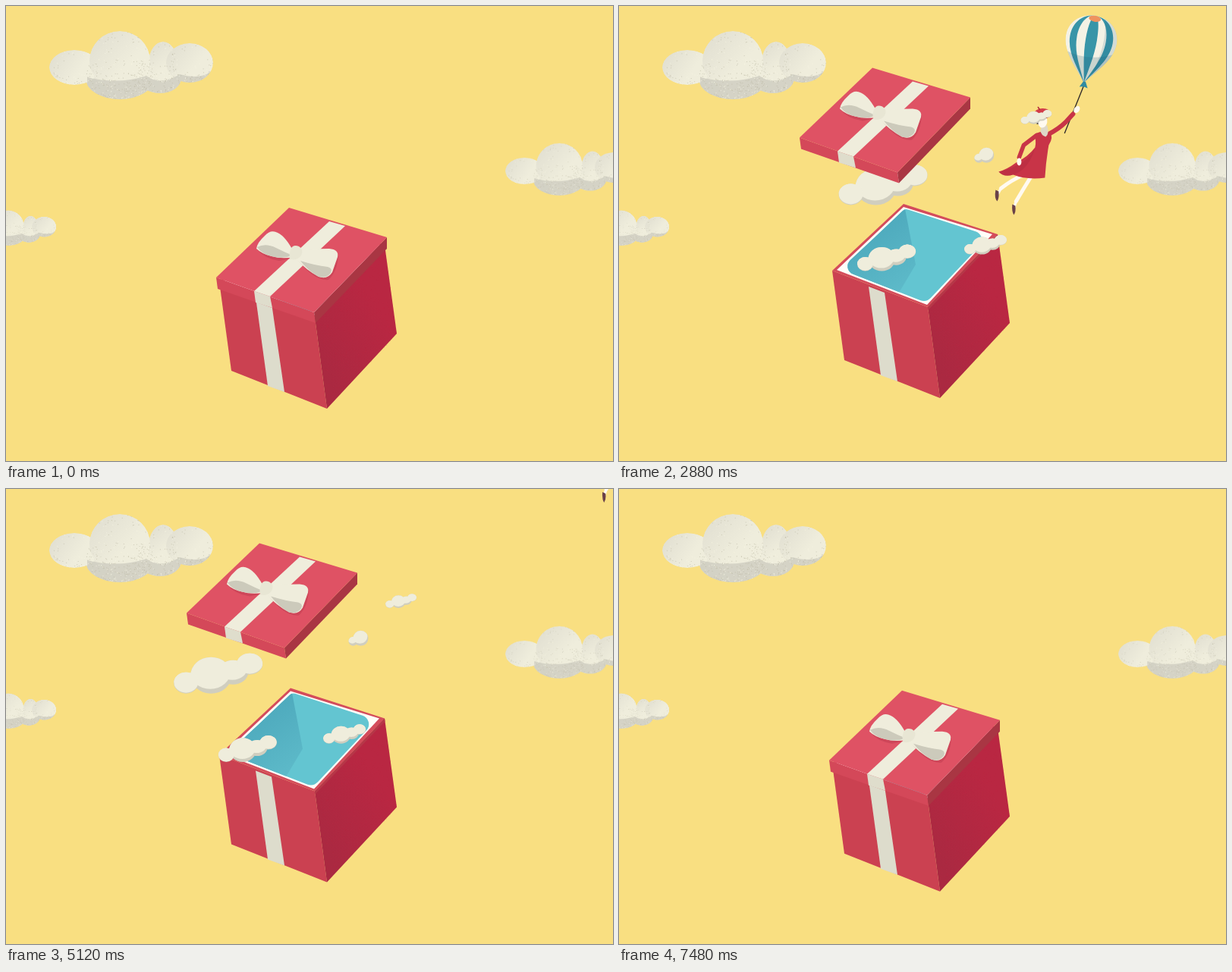
These frames come from a looping animation (800x600 px, 7.52 s). An HTML page with a canvas:

```html
<!DOCTYPE html>
<html lang="en">
<head>
<meta charset="utf-8">
<title>Gift box</title>
<style>
html, body { margin: 0; width: 100%; height: 100%; overflow: hidden; background: #f9df81; }
canvas { display: block; }
</style>
</head>
<body>
<canvas id="stage" width="800" height="600"></canvas>
<script>
const LOOP = 7520;
const ctx = document.getElementById('stage').getContext('2d');
const CREAM = '#efeddc', SHADE = '#d0cebf', SKIN = '#fffaf0', HAIR = '#2e2a30';
const RED = '#c83447', TEAL = '#3895a8', WHITE = '#f4f2e5';

let seed = 7;
const rnd = () => (seed = (seed * 16807) % 2147483647) / 2147483647;

// Progress of t from a to b, and two easings of it.
const span = (t, a, b) => Math.min(1, Math.max(0, (t - a) / (b - a)));
const smooth = u => u * u * (3 - 2 * u);
const overshoot = u => 1 + 3.2 * (u - 1) ** 3 + 2.2 * (u - 1) ** 2;

function fill(color, d, g = ctx) {
  g.fillStyle = color;
  g.fill(new Path2D(d));
}
function line(color, width, d) {
  ctx.strokeStyle = color;
  ctx.lineWidth = width;
  ctx.stroke(new Path2D(d));
}
function oval(color, x, y, rx, ry, turn = 0) {
  ctx.fillStyle = color;
  ctx.beginPath();
  ctx.ellipse(x, y, rx, ry, turn, 0, 7);
  ctx.fill();
}
function placed(x, y, draw, scale = 1, turn = 0) {
  ctx.save();
  ctx.translate(x, y);
  ctx.rotate(turn);
  ctx.scale(scale, scale);
  draw();
  ctx.restore();
}
function blend(x0, y0, x1, y1, from, to, g = ctx) {
  const grad = g.createLinearGradient(x0, y0, x1, y1);
  grad.addColorStop(0, from);
  grad.addColorStop(1, to);
  return grad;
}
function ovals(list, dx = 0, dy = 0) {
  const p = new Path2D();
  for (const [x, y, rx, ry] of list) {
    p.moveTo(x + dx + rx, y + dy);
    p.ellipse(x + dx, y + dy, rx, ry, 0, 0, 7);
  }
  return p;
}

// Large grainy cloud, painted once.
function grainyCloud() {
  const c = document.createElement('canvas');
  c.width = 220;
  c.height = 94;
  const g = c.getContext('2d');
  const parts = [[146, 63, 28, 20], [93, 64, 45, 27], [150, 42, 19, 27], [185, 43, 31, 26], [33, 49, 33, 23], [93, 40, 40, 39]];
  g.clip(ovals(parts));
  for (const [x, y, rx, ry] of parts) {
    g.fillStyle = blend(x - rx, y - ry, x + rx * .2, y + ry * .2, '#dfddd0', CREAM, g);
    g.fill(ovals([[x, y, rx, ry]]));
  }
  fill('rgba(205,203,191,.75)', 'M50 62Q92 72 128 60Q146 74 172 58Q200 66 215 53V94H50Z', g);
  for (const [x, y, rx, ry] of parts) {
    for (let i = 0; i < rx * ry * .5; i++) {
      const r = Math.sqrt(rnd()), a = rnd() * 2 * Math.PI;
      if (rnd() > r * r * (.2 + .8 * Math.max(0, Math.sin(a + .35)))) continue;
      g.fillStyle = rnd() < .6 ? 'rgba(185,182,160,.6)' : 'rgba(250,248,230,.7)';
      g.fillRect(x + rx * r * Math.cos(a), y + ry * r * Math.sin(a), 1, 1);
    }
  }
  return c;
}
const bigCloud = grainyCloud();

const PUFFS = [[-42, 13, 16, 14], [-9, 3, 27, 24], [20, -1, 20, 16], [42, -12, 17, 14]];
const TINY = [[-7, 4, 6, 6], [3, 0, 10, 10]];

function puff(list) {
  const shape = ovals(list);
  ctx.fillStyle = SHADE;
  ctx.fill(shape);
  ctx.clip(shape);
  ctx.fillStyle = CREAM;
  ctx.fill(ovals(list, -1, list === TINY ? -3 : -6));
  if (list === PUFFS) ctx.fill(ovals([list[0], list[3]], 0, -1));
}

// Slow bobbing of the box, and of everything floating around it.
const boxRise = t => -15 * Math.sin(Math.PI * t / LOOP) ** 1.1;
const sway = t => 6 * Math.cos((t - 3200) / 796);

// Position when just out of the box, then speed in pixels per second.
const clouds = {
  big: { x: 383, y: 221, vx: -30.5, vy: 7.7, size: 1, bob: sway },
  middle: { x: 370, y: 341, vx: -15.3, vy: 4, size: .66, bob: boxRise },
  right: { x: 502, y: 325, vx: -16.5, vy: 3, size: .48, bob: boxRise, delay: 320 },
  small: { x: 565, y: 135, vx: -13.1, vy: 5, size: .35, bob: sway },
  tiny: { x: 490, y: 186, vx: -7.5, vy: 4.5, size: 1, bob: sway, parts: TINY }
};
function drift(t, { x, y, vx, vy, size, bob, delay = 0, parts = PUFFS }) {
  const s = (t - 1720) / 1000, pop = span(t - delay, 1000, 1550), leave = span(t, 6400, 7350);
  const grow = smooth(pop) * (1 - leave ** 3);
  if (grow < .01) return;
  x += vx * s;
  y += vy * s + bob(t);
  const out = overshoot(pop), away = Math.sign(x - 385) * 130 * leave ** 2;
  placed(390 + (x - 390) * out + away, 330 + (y - 330) * out, () => puff(parts), size * grow);
}

const grain = Array.from({ length: 700 }, () => [rnd(), rnd()]);

function body() {
  fill('#cb4151', 'M281 363L407 411L423 531L297 481Z');
  fill(blend(407, 470, 500, 410, '#aa2941', '#b92742'), 'M407 411L499 315L515 432L423 531Z');
  ctx.fillStyle = 'rgba(205,45,75,.2)';
  for (const [u, v] of grain) ctx.fillRect(409 + 90 * u + 16 * v, 409 - 94 * u + 118 * v, 1, 1);
  fill('#dddccc', 'M329 384L350 392L367 509L345 501Z');
  fill('#d44c5b', 'M375 275L499 315L407 411L281 363Z');
  fill('#b63748', 'M499 315L407 411L407.5 415L499.5 319Z');
  fill('#fffdf8', 'M375 279L492 315L406 408L287 362Z');
  const p = new Path2D();
  p.moveTo(335, 321);
  p.arcTo(377, 281, 488, 317, 7);
  p.arcTo(488, 317, 405, 405, 12);
  p.arcTo(405, 405, 292, 361, 13);
  p.arcTo(292, 361, 377, 281, 11);
  p.closePath();
  ctx.save();
  ctx.fillStyle = '#63c5d1';
  ctx.fill(p);
  ctx.clip(p);
  fill(blend(330, 310, 380, 385, '#4eaabd', '#5dbac9'), 'M376 276L391 355L366 397L270 366Z');
  ctx.restore();
}

function lid() {
  fill('#d44859', 'M277 358L406 404L408 418L279 373Z');
  fill('#a93643', 'M406 404L502 305V320L408 418Z');
  fill('#df5264', 'M373 266L502 305L406 404L277 358Z');
  fill(CREAM, 'M426 284L447 290L348 383L327 376Z');
  fill('#dfddcc', 'M327 376L348 383L351 398L329 391Z');
  fill('rgba(165,45,65,.3)', 'M384 334Q415 335 438 328Q437 350 425 361Q406 363 384 334ZM331 321Q350 332 376 333L360 336Q340 333 331 321Z');
  fill(CREAM, 'M380 326Q369 304 358 299Q349 294 341 303Q331 312 330 320Q337 327 350 330Q363 334 380 331Z');
  fill('#cccabb', 'M331 318Q342 312 356 319Q368 325 378 329Q364 334 350 330Q337 327 331 318Z');
  fill(CREAM, 'M383 324Q401 320 426 320Q439 321 437 331L430 351Q424 361 412 357Q395 348 382 333Z');
  fill('#cccabb', 'M388 336Q407 342 424 344Q431 346 428 352Q422 360 412 357Q399 350 388 336Z');
  fill('#e8e6d4', 'M375 321Q378 314 386 317Q393 321 389 329Q384 336 375 334Q372 329 375 321Z');
}

function balloon() {
  const shell = k => `M0 56C${-13 * k} 38 ${-34 * k} 20 ${-34 * k} -2C${-34 * k} -22 ${-18 * k} -34 0 -34C${18 * k} -34 ${34 * k} -22 ${34 * k} -2C${34 * k} 20 ${13 * k} 38 0 56Z`;
  ctx.save();
  ctx.clip(new Path2D(shell(1)));
  [1, .84, .57, .22].forEach((k, i) => fill(i % 2 ? TEAL : WHITE, shell(k)));
  fill('rgba(30,90,115,.2)', 'M-40 14Q0 32 40 8V60H-40Z');
  fill('rgba(20,90,120,.15)', 'M12 -34Q24 0 4 56H40V-34Z');
  oval('#ee935f', 0, -30, 8, 4);
  ctx.restore();
  fill('#318ca1', 'M-1 54L2 54L6 62Q0 60 -5 62Z');
}

function beret() {
  oval('#d23c49', 0, 0, 11, 6.5);
  fill('#b32c3b', 'M-10 3Q0 8 10 2Q7 8 0 7Q-7 7 -10 3Z');
  line('#b32c3b', 1.5, 'M-4 -5L-6 -8');
}

const HAT_OFF = 2960;

// Figure drawn around its raised hand.
function lady(t) {
  const hatless = t >= HAT_OFF, loose = smooth(span(t, HAT_OFF, 3350));
  const mix = (a, b) => a + (b - a) * loose;
  ctx.lineCap = ctx.lineJoin = 'round';
  line('#2a2527', 1.3, 'M-16 31L9 -31');
  placed(9, -33, () => placed(0, -58, balloon), 1, .17 + .11 * (1 - span(t, 1720, 2880)));

  line(SKIN, 5, 'M-70 86Q-86 93 -100 104M-60 88Q-70 104 -80 121');
  line(SKIN, 3.5, 'M-100 104L-105 113M-80 121L-83 130');
  fill('#694148', 'M-107 106L-103 108Q-102 117 -105 121Q-109 117 -107 106ZM-85 125L-81 127Q-80 135 -83 139Q-86 134 -85 125Z');

  fill(RED, 'M-56 33Q-47 27 -36 30Q-30 36 -37 47L-38 53Q-41 72 -42 90Q-66 93 -84 86Q-96 90 -103 82Q-92 79 -80 70Q-64 62 -55 50Q-53 42 -56 33Z');
  fill('rgba(145,25,50,.2)', 'M-55 51Q-63 67 -80 74Q-92 80 -103 82Q-96 90 -84 86Q-64 80 -55 51Z');
  line(RED, 6, 'M-38 33Q-24 26 -15 17L-5 6');
  const ex = mix(-70, -79), ey = mix(47, 34), hx = mix(-76, -96), hy = mix(63, 41);
  line(RED, 5.5, `M-53 34L${ex} ${ey}L${hx} ${hy}`);
  oval(SKIN, hx - mix(0, 4), hy + mix(6, 1), mix(3, 5), mix(5, 2.6));

  fill(HAIR, hatless ? 'M-53 23Q-56 5 -45 4Q-33 4 -32 22Q-38 28 -42 23Z' : 'M-53 19Q-56 10 -52 6L-37 8L-48 20Z');
  fill('#ded8c7', 'M-46 20L-39 21Q-36 33 -41 36Q-47 34 -48 28Z');
  oval(SKIN, -45, 16, 6, 8, .15);
  if (hatless) fill(HAIR, 'M-54 15Q-48 10 -40 10L-36 14L-40 4L-49 5Z');
  else placed(-45, 5, beret);
  oval(SKIN, 0, 0, 3.6, 5, .6);
}

function frame(now) {
  const t = now % LOOP, s = (t - 1720) / 1000, rise = boxRise(t);
  ctx.fillStyle = '#f9df81';
  ctx.fillRect(0, 0, 800, 600);
  for (const [x, y, k] of [[57, 32, 1], [658, 180, .766], [-45, 269, .515]]) {
    ctx.drawImage(bigCloud, x, y, 220 * k, 94 * k);
  }

  drift(t, clouds.big);

  // The closed box rocks on its front corner, then the lid pops off.
  const shake = span(t, 0, 800) * Math.PI;
  const open = overshoot(t < 4000 ? span(t, 780, 1780) : 1 - span(t, 6460, 6940));
  ctx.save();
  ctx.translate(423, 531);
  ctx.rotate(.065 * Math.sin(2 * shake) * Math.sin(shake));
  ctx.translate(-423, -531);
  placed(0, rise, body);
  drift(t, clouds.middle);
  drift(t, clouds.right);
  placed(-39 * Math.min(1, open), Math.min(rise, (sway(t) - 190) * open), lid);
  ctx.restore();

  drift(t, clouds.tiny);
  if (t > 1000 && t < 5700) {
    ctx.save();
    if (t < 2200) {
      ctx.clip(new Path2D(`M0 0V${362 + rise}H287L406 ${408 + rise}L492 ${315 + rise}H800V0Z`));
    }
    const climb = 400 * Math.min(0, s) ** 2;
    placed(446 + 141 * s - 4.7 * s * s, 270 - 115 * s + climb, () => lady(t));
    ctx.restore();
  }
  if (t >= HAT_OFF && t < 4400) {
    const blown = (t - HAT_OFF) / 1000;
    placed(568 - 94 * blown, 132 - 117 * blown, beret, 1, -.9 * Math.sin(3.7 * blown));
  }
  drift(t, clouds.small);
}

const start = performance.now();
function tick() {
  frame(performance.now() - start);
  requestAnimationFrame(tick);
}
tick();
</script>
</body>
</html>
```
